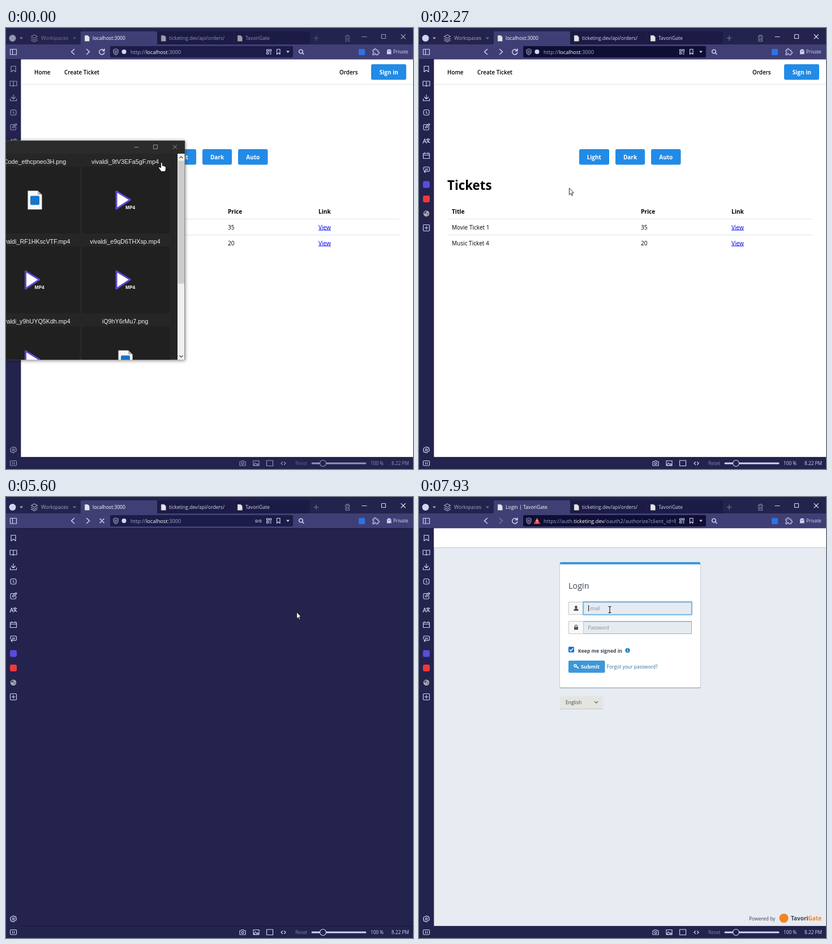
Recreate the animation shown at these times as an HTML page. Size 719 px wide and 779 px high, loop 8 s.

```html
<!DOCTYPE html>
<html lang="en">
<head>
<meta charset="utf-8">
<title>Ticketing sign-in</title>
<style>
html, body { margin: 0; width: 100%; height: 100%; overflow: hidden; background: #24234d; }
svg { display: block; width: 719px; height: 779px; }
text { font: 10.1px "Open Sans", "Noto Sans", sans-serif; white-space: pre; }
.ui text { font-size: 8.6px; fill: #d4d3f3; }
.ui .url { font-size: 9.2px; fill: #a5a4cf; }
.ui .url tspan { fill: #fff; }
.ui .small { font-size: 8.25px; }
.ui .faint { fill: #8483ae; }
.ui .lit { fill: #fff; }
.ui .count { font-size: 7.5px; font-weight: 600; }
.icon { fill: none; stroke: #d4d3f3; stroke-width: 1.15; stroke-linejoin: round; stroke-linecap: round; }
.thick { stroke-width: 1.5; }
.solid { fill: #d4d3f3; }
.semi { font-size: 9.85px; font-weight: 600; }
.bold { font-weight: 700; }
.title { font-size: 22.3px; font-weight: 700; }
.button rect { fill: #228be6; }
.button text { fill: #fff; font-size: 10px; font-weight: 700; text-anchor: middle; }
.link { fill: #00e; text-decoration: underline; }
.files text { font: 10.75px "Liberation Sans", Arial, sans-serif; fill: #f2f2f2; text-anchor: middle; }
#play text { font: 700 8.3px "Liberation Sans", Arial, sans-serif; fill: #fff; text-anchor: start; }
.login text { font-size: 8.5px; fill: #3c4650; }
.login .heading { font-size: 14.4px; font-weight: 500; }
.login .keep { font-size: 8.65px; }
.login .brand { font-size: 10px; }
.login .hint { font-size: 8.3px; fill: #858b92; }
.login .go { fill: #fff; font-size: 9.3px; font-weight: 700; }
.login .forgot { fill: #2a6f9e; }
.missing { fill: none; stroke: #68717a; stroke-width: .9; }

/* The loop lasts 8 s, so 1% is 80 ms. */
.t { animation: 8s step-end infinite; }
.home { animation-name: home; }
.login { animation-name: login; }
.local { animation-name: local; }
.remote { animation-name: remote; }
.unready { animation-name: unready; }
.ready { animation-name: ready; }
.idle { animation-name: idle; }
.busy { animation-name: busy; }
.count { animation-name: count; }
.tail { animation-name: tail; }
.field { animation-name: field; }
.forward { animation-name: forward; }
.wake { animation-name: wake; }
.status { animation-name: status; }
.hover { animation-name: hover; }
.caret { animation-name: caret; }
.arrow { animation-name: arrow; }
.hand { animation-name: hand; }
.beam { animation-name: beam; }
.files { animation: files 8s infinite; transform-origin: 120px 779px; }
.cursor { animation: move 8s linear infinite; }

@keyframes home { 0% { opacity: 1 } 70% { opacity: 0 } }
@keyframes login { 0% { opacity: 0 } 71.6% { opacity: 1 } }
@keyframes local { 0% { opacity: 1 } 70.8% { opacity: 0 } }
@keyframes remote { 0% { opacity: 0 } 70.8% { opacity: 1 } }
@keyframes unready { 0% { opacity: 1 } 73.3% { opacity: 0 } }
@keyframes ready { 0% { opacity: 0 } 73.3% { opacity: 1 } }
@keyframes idle { 0% { opacity: 1 } 50% { opacity: 0 } 73.3% { opacity: 1 } }
@keyframes busy { 0% { opacity: 0 } 50% { opacity: 1 } 73.3% { opacity: 0 } }
@keyframes count { 0% { opacity: 0 } 50% { opacity: 1 } 97.5% { opacity: .5 } 98.3% { opacity: 0 } }
@keyframes tail { 0% { opacity: 0 } 98.3% { opacity: 1 } }
@keyframes field { 0% { fill: #1c1c49 } 5.8% { fill: #0f0f35 } 50% { fill: #1c1c49 } 71.6% { fill: #0f0f35 } }
@keyframes forward { 0% { opacity: 1 } 70.8% { opacity: .4 } }
@keyframes wake { 0% { opacity: .65 } 5.8% { opacity: 1 } }
@keyframes status { 0% { opacity: 0 } 33.2% { opacity: 1 } 40.9% { opacity: 0 } }
@keyframes hover { 0% { fill: #228be6 } 46.6% { fill: #1c7ed6 } 51.6% { fill: #228be6 } }
@keyframes caret { 0% { opacity: 0 } 71.6% { opacity: 1 } 78.3% { opacity: 0 } 85% { opacity: 1 } 91.6% { opacity: 0 } 98.3% { opacity: 1 } }
@keyframes arrow { 0% { opacity: 0 } 3.3% { opacity: 1 } 33.2% { opacity: 0 } 39.2% { opacity: 1 } 46.6% { opacity: 0 } 51.6% { opacity: 1 } 82% { opacity: 0 } }
@keyframes hand { 0% { opacity: 1 } 3.3% { opacity: 0 } 33.2% { opacity: 1 } 39.2% { opacity: 0 } 46.6% { opacity: 1 } 51.6% { opacity: 0 } }
@keyframes beam { 0% { opacity: 0 } 82% { opacity: 1 } }
@keyframes files {
  0%, 5% { opacity: 1; transform: none }
  7.5%, 100% { opacity: 0; transform: translateY(60px) scale(.8) }
}
@keyframes move {
  0%, .87% { transform: translate(275px, 238px); animation-timing-function: ease-in-out }
  5%, 6.6% { transform: translate(232px, 208px); animation-timing-function: ease-in-out }
  10.87%, 11.6% { transform: translate(280px, 350px) }
  13.37% { transform: translate(246px, 346px) }
  16.5% { transform: translate(199px, 322px) }
  18.5% { transform: translate(212px, 284px) }
  20.87%, 26.6% { transform: translate(240px, 277px); animation-timing-function: ease-in-out }
  35.87%, 38.37% { transform: translate(569px, 350px) }
  40% { transform: translate(581px, 346px); animation-timing-function: ease-in-out }
  48.37%, 50% { transform: translate(676px, 80px); animation-timing-function: ease-in-out }
  57.5%, 76.6% { transform: translate(513px, 203px); animation-timing-function: ease-in }
  80% { transform: translate(430px, 224px); animation-timing-function: ease-out }
  85%, 100% { transform: translate(337px, 199px) }
}
</style>
</head>
<body>
<svg viewBox="0 0 719 779">
  <defs>
    <path id="doc" d="M-4-5H1.5L4.5-2V5.5H-4Z" fill="#e4e4e4" stroke="#77778c" stroke-width=".5"/>
    <path id="down" d="M-3-1.5H3L0 2Z"/>
    <g id="play">
      <path d="M-12-15L12.5 0L-12 16Z" fill="#fff" stroke="#5f46cf" stroke-width="3" stroke-linejoin="round"/>
      <text x="4" y="16.5">MP4</text>
    </g>
    <g id="picture">
      <path d="M-12.5-16H5L12.5-9V17H-12.5Z" fill="#f6f6f6"/>
      <path d="M5-16V-9H12.5Z" fill="#b5b5b5"/>
      <rect x="-8" y="-7" width="16" height="16" rx="2" fill="#1674c9"/>
    </g>
    <rect id="tofu" x="-2.2" y="-3.5" width="4.4" height="7"/>
    <clipPath id="urlClip"><rect x="216" y="32" width="238" height="20"/></clipPath>
    <clipPath id="filesClip"><rect y="199" width="317" height="387"/></clipPath>
    <filter id="shade" x="-10%" y="-10%" width="120%" height="120%"><feDropShadow dx="0" dy="1" stdDeviation="3" flood-opacity=".5"/></filter>
  </defs>

  <rect width="719" height="779" fill="#24234d"/>

  <g class="ui">
    <rect x="267" y="6" width="270" height="23" fill="#1c1b45"/>
    <path d="M402.5 8V27" stroke="#24234d"/>
    <path d="M132 29V8q0-2 2-2H265q2 0 2 2V29H719V55H0V29Z" fill="#403f75"/>
    <path d="M0 55.5H719M26 758.5H719" stroke="#17163c"/>
    <g class="t wake">
      <circle class="solid" cx="11.5" cy="18" r="6"/>
      <g class="solid" opacity=".75"><use href="#down" x="27" y="18"/><use href="#down" x="121" y="18" opacity=".6"/></g>
      <path class="icon" opacity=".75" d="M50 12L55.5 15L50 18L44.5 15ZM44.5 18.5L50 21.5L55.5 18.5M44.5 21.5L50 24.5L55.5 21.5"/>
      <text x="62" y="21" opacity=".75">Workspaces</text>
      <path class="icon" opacity=".5" d="M544 18H552M548 14V22M599 14.5H607.5M601.5 14V12.5H605V14M600 15V23.5H606.5V15M602 17V21.5M604.5 17V21.5"/>
      <path class="icon" d="M629 15.5H637M663.5 11.5H670.5V18.5H663.5ZM698 11.5L705.5 19M705.5 11.5L698 19"/>
      <use href="#doc" x="278" y="18"/><use href="#doc" x="413" y="18"/>
      <text x="288" y="21">ticketing.dev/api/orders/</text>
      <text x="423" y="21">TavoriGate</text>
    </g>
    <use href="#doc" x="143" y="18"/>
    <text class="lit t local" x="153" y="21">localhost:3000</text>
    <text class="lit t remote" x="153" y="21">Login | TavoriGate</text>

    <path class="icon" d="M7.5 37.5H18.5V47H7.5ZM11.5 37.5V47"/>
    <path class="icon thick" d="M120.5 37.5L115.5 42L120.5 46.5"/>
    <path class="icon thick t forward" d="M142.5 37.5L147.5 42L142.5 46.5"/>
    <path class="icon thick t idle" d="M173 39.5A4.6 4.6 0 1 0 173.8 43.5M173.8 37V40.5H170.3"/>
    <path class="icon thick t busy" d="M166 38.5L173 45.5M173 38.5L166 45.5"/>
    <rect class="t field" x="184" y="32" width="323" height="20" rx="2" fill="#0f0f35"/>
    <path class="icon" opacity=".75" d="M194 37L198 38.5V42Q198 45.5 194 47.5Q190 45.5 190 42V38.5ZM192 40.5H196M192 42.5H196M193 44.5H195"/>
    <circle class="solid t local" cx="208.5" cy="42" r="4"/>
    <g class="t remote"><path d="M208.5 36.5L214.5 47.5H202.5Z" fill="#e5473c"/><path d="M208.5 40V43.5M208.5 45V46" stroke="#fff" stroke-width="1.2"/></g>
    <text class="url t local" x="220" y="46">http://<tspan>localhost</tspan>:3000</text>
    <g clip-path="url(#urlClip)">
      <text class="url t remote" x="220" y="46">https://auth.<tspan>ticketing.dev</tspan>/oauth2/authorize?client_</text>
      <text class="url t tail" x="437" y="46">id=8</text>
    </g>
    <text class="t count" x="440" y="45">0/0</text>
    <path class="icon" d="M460.5 38H463.5V41H460.5ZM465.5 38H468.5V41H465.5ZM460.5 43H463.5V46H460.5ZM466 43.5H468.5M466 46H468.5M478.5 37.5H484V46.5L481.25 44L478.5 46.5Z"/>
    <use class="solid" href="#down" x="498" y="42"/>
    <path class="icon thick" d="M523.5 44L526 46.5M521 38.2a3.3 3.3 0 1 1-.1 0Z"/>
    <rect x="623" y="37" width="11" height="11" rx="1.5" fill="#2b73e6"/>
    <path class="icon" d="M648 39H650.5Q650 36.5 652 36.5T653.5 39H657V42Q659.5 41.5 659.5 43.5T657 45V47.5H653.5Q653.5 45 652 45T650.5 47.5H648V44.5Q650 44.5 650 43T648 41.5Z"/>
    <path class="solid" d="M673 47V41Q673 37.5 676.75 37.5T680.5 41V47L678.5 45.5L676.75 47L675 45.5Z"/><path d="M675 41H676.2M677.5 41H678.7" stroke="#403f75" stroke-width="1.3"/>
    <text class="small" x="684" y="45">Private</text>

    <g class="t wake">
      <g class="icon">
        <path d="M9 67.5H17V77.5L13 74.5L9 77.5ZM7 94H12Q13 94 13 95Q13 94 14 94H19V102H14L13 103L12 102H7ZM13 95V102M13 118V125M9.5 122L13 125.5L16.5 122M7.5 125V128.5H18.5V125"/>
        <rect x="8" y="144.5" width="10" height="9.5" rx="3.5"/><path d="M13 147V150L14.5 151"/>
        <path d="M15 170.5H9Q8 170.5 8 172V178.5Q8 180 9.5 180H16Q17.5 180 17.5 178.5V175M11.5 176.5L12 174L17.5 169L19 170.5L14 176Z"/>
        <path d="M7 203.5L10 196L13 203.5M8 201H12M13 196.5H19M16 195V196.5M14 196.5Q15 200.5 19 202.5M18 196.5Q17.5 200 14.5 202"/>
        <path d="M7.5 221.5H18.5V230.5H7.5ZM7.5 224.5H18.5M10 220V222M16 220V222M10 245.5H16Q18.5 245.5 18.5 248V251Q18.5 253.5 16 253.5H9M11 251.5L9 253.5L11 255.5M8 251V248Q8 245.5 10 245.5M11 249H15.5M11 251H15.5"/>
        <rect x="7.5" y="347.5" width="11" height="11" rx="1.5"/><path d="M10 353H16M13 350V356"/>
        <path d="M12 740H14L14.5 741.5L16.5 740.8L18 742.5L17 744L18.5 745L17.5 748L16 748L14.5 749L14 750.5H12L11.5 749L9.5 749.5L8 748L8.5 746L7.5 745L8.5 742L10 741.5L11.5 741Z"/><circle cx="13" cy="745.3" r="1.7"/>
        <rect x="7.5" y="764.5" width="11" height="8.5" rx="1.5"/><path d="M11.5 767V770.5M14.5 767V770.5"/>
        <path d="M413 766H415.5L416.5 764.5H419.5L420.5 766H423V773H413Z"/><circle cx="418" cy="769.3" r="1.8"/>
        <path d="M437 764.5H447V773H437ZM437.5 772.5L440.5 768L443 771L444.5 769.5L446.5 772.5ZM460.5 764H471.5V773.5H460.5ZM488.5 766.5L486 769L488.5 771.5M491.5 766.5L494 769L491.5 771.5"/>
      </g>
      <rect x="7" y="270.5" width="12" height="12" rx="3" fill="#5b4be0"/>
      <rect x="7" y="296" width="12" height="12" rx="3" fill="#ef3939"/>
      <circle cx="13" cy="327.8" r="5.3" fill="#a8a8ae"/><path d="M9 325Q12 323 14 325L12 328L9.5 328ZM14 328L17 327L15 331Z" fill="#55556c"/>
      <text class="small faint" x="511" y="772">Reset</text>
      <path d="M541 769H635" stroke="#d4d3f3" stroke-width="3" stroke-linecap="round"/>
      <circle cx="560" cy="769" r="5.5" fill="#24234d" stroke="#d4d3f3" stroke-width="1.2"/>
      <text class="small" x="644" y="772">100 %</text>
      <text class="small" x="681" y="772">8.22 PM</text>
    </g>
    <text class="small faint t status" x="34" y="772">http://localhost:3000/tickets/65a61f03a3732a740f80e9d5</text>
  </g>

  <g class="t home">
    <rect x="26.4" y="55.4" width="692.6" height="702.4" fill="#fff"/>
    <path d="M26.4 99.7H719M50 337.5H695M50 365.5H695" stroke="#dee2e6"/>
    <text class="semi" x="50" y="82">Home</text>
    <text class="semi" x="103" y="82">Create Ticket</text>
    <text class="semi" x="589" y="82">Orders</text>
    <g class="button">
      <rect class="t hover" x="645" y="64" width="62" height="27.5" rx="3"/><text x="676.3" y="82">Sign in</text>
      <rect x="283" y="214" width="53" height="27.5" rx="3"/><text x="309.3" y="232">Light</text>
      <rect x="347" y="214" width="52" height="27.5" rx="3"/><text x="373" y="232">Dark</text>
      <rect x="410" y="214" width="52.5" height="27.5" rx="3"/><text x="436.3" y="232">Auto</text>
    </g>
    <text class="title" x="50" y="286">Tickets</text>
    <text class="bold" x="58" y="328">Title</text><text class="bold" x="392" y="328">Price</text><text class="bold" x="552" y="328">Link</text>
    <text x="58" y="355.5">Movie Ticket 1</text><text x="392" y="355.5">35</text><text class="link" x="552" y="355.5">View</text>
    <text x="58" y="383.5">Music Ticket 4</text><text x="392" y="383.5">20</text><text class="link" x="552" y="383.5">View</text>
  </g>

  <g class="t login">
    <rect x="26.4" y="55.4" width="692.6" height="702.4" fill="#e7ebf2"/>
    <rect x="26.4" y="55.4" width="692.6" height="33.6" fill="#fff"/>
    <path d="M26.4 89.5H719" stroke="#c3c7cd"/>
    <rect x="248.5" y="116" width="249" height="222" rx="2" fill="#a9aeb5"/>
    <rect x="249" y="115" width="248" height="221.5" rx="2" fill="#fff"/>
    <path d="M249 119V117q0-2 2-2H495q2 0 2 2V119Z" fill="#3c97da"/>
    <text class="heading" x="264" y="162">Login</text>
    <g stroke="#a3abb4" fill="#e6ebf2">
      <path d="M290.5 185.5H481.5V207.5H290.5ZM290.5 219.5H481.5V241.5H290.5Z"/>
      <path d="M264.5 185.5H290.5V207.5H264.5ZM264.5 219.5H290.5V241.5H264.5Z" fill="#f8f8f8" stroke="#c3c5c9"/>
      <path d="M291 186.5H481M291 220.5H481" stroke="#bcc5cf"/>
    </g>
    <rect x="264" y="264.5" width="10" height="10" rx="1.5" fill="#0b6fdc"/>
    <path d="M266 269.5L268.3 272L272.3 267" fill="none" stroke="#fff" stroke-width="1.5"/>
    <text class="keep bold" x="281" y="274.5">Keep me signed in</text>
    <rect x="249" y="353" width="76" height="22" rx="2" fill="#c5c6c5"/>
    <rect x="249" y="352" width="76" height="22" rx="2" fill="#e4e4e1"/>
    <text x="259" y="366">English</text>
    <text x="583" y="747.5">Powered by</text>
    <circle cx="644.5" cy="744" r="8" fill="#f58320"/>
    <text class="brand bold" x="657" y="748">Tavori<tspan fill="#f58320">Gate</tspan></text>

    <g class="t unready">
      <g class="missing"><use href="#tofu" x="277.5" y="196"/><use href="#tofu" x="277.5" y="230"/><use href="#tofu" x="312.5" y="361.5"/></g>
      <use class="missing" href="#tofu" x="368" y="271" style="stroke:#2180b8"/>
      <text class="hint" x="300" y="199.5">Email</text><text class="hint" x="300" y="233.5">Password</text>
      <rect x="264" y="289" width="62.5" height="21.5" rx="2" fill="#3c97da"/>
      <use class="missing" href="#tofu" x="277.3" y="299.7" style="stroke:#fff"/>
      <text class="go" x="284" y="303">Submit</text><text class="forgot" x="329.5" y="303">Forgot your password?</text>
    </g>
    <g class="t ready">
      <rect x="290" y="185" width="192" height="23" rx="1" fill="none" stroke="#9accf0" stroke-width="2.5"/>
      <rect x="290.5" y="185.5" width="191" height="22" fill="none" stroke="#6fb1e0"/>
      <path d="M277.5 192a2.3 2.5 0 1 1-.1 0ZM273.5 201V199.5Q273.5 197 277.5 197T281.5 199.5V201Z" fill="#4a4f55"/>
      <path d="M274 229.5H281V234.5H274Z" fill="#4a4f55"/><path d="M275.5 230V228a2 2 0 0 1 4 0V230" fill="none" stroke="#4a4f55" stroke-width="1.2"/>
      <text class="hint" x="298.5" y="199.5">Email</text><text class="hint" x="298.5" y="233.5">Password</text>
      <circle cx="368.5" cy="271" r="4.2" fill="#2180b8"/><path d="M368.5 268V269.3M368.5 270.5V273.5" stroke="#fff" stroke-width="1.3"/>
      <rect x="264" y="289" width="64.5" height="21.5" rx="2" fill="#3c97da"/>
      <g fill="none" stroke="#fff" stroke-width="1.5"><circle cx="276" cy="298" r="2"/><path d="M277.5 299.5L282 303M280 301.5L281 300"/></g>
      <text class="go" x="286" y="303">Submit</text><text class="forgot" x="331.5" y="303">Forgot your password?</text>
      <path d="M310 361L313.2 364L316.4 361" fill="none" stroke="#555b62" stroke-width="1.1"/>
    </g>
    <path class="t caret" d="M299.5 191V202" stroke="#222"/>
  </g>

  <g class="files">
    <rect x="-40" y="199" width="356" height="387" fill="#272727" stroke="#777" stroke-width=".6" filter="url(#shade)"/>
    <rect y="199.5" width="316" height="22.5" fill="#2b2b2b"/>
    <path d="M226.5 210.5H234M260.5 206.5H267.5V213.5H260.5ZM295 206.5L302 213.5M302 206.5L295 213.5" fill="none" stroke="#9a9a9a"/>
    <g clip-path="url(#filesClip)">
      <path d="M0 245H130V363H0ZM134 245H289.5V363H134ZM0 386H130V504H0ZM134 386H289.5V504H134ZM0 527H130V586H0ZM134 527H289.5V586H134Z" fill="#202020"/>
      <text x="51" y="239.5">Code_ethcpneo3H.png</text><text x="210.5" y="239.5">vivaldi_9tV3EFa5gF.mp4</text>
      <text x="51" y="380.5">vivaldi_RF1HKscVTF.mp4</text><text x="210.5" y="380.5">vivaldi_e9qD6THXsp.mp4</text>
      <text x="51" y="521.5">vivaldi_y9hUYQ5Kdh.mp4</text><text x="210.5" y="521.5">iQ9hY6rMu7.png</text>
      <use href="#picture" x="51" y="303.5"/><use href="#play" x="207" y="303.5"/>
      <use href="#play" x="46.5" y="444.5"/><use href="#play" x="207" y="444.5"/>
      <use href="#play" x="46.5" y="585.5"/><use href="#picture" x="211" y="585.5"/>
    </g>
    <rect x="303" y="222" width="12.5" height="364" fill="#f0f0f0"/>
    <rect x="304" y="234.5" width="11" height="217" fill="#cdcdcd"/>
    <path d="M306.5 230L309.5 227L312.5 230M306.5 578.5L309.5 581.5L312.5 578.5" fill="none" stroke="#505050" stroke-width="1.3"/>
  </g>

  <g class="cursor" fill="#fff" stroke="#111" stroke-width=".9" stroke-linejoin="round">
    <path class="t arrow" d="M.5.2V12L3.2 9.5L5 13.6L6.7 12.8L5 8.8H8.4Z"/>
    <path class="t hand" d="M-1.5 9V1Q-1.5-.5-.2-.5T1.2 1V5.5Q2.5 4.5 3.6 6Q5 5.2 5.7 6.6Q7.3 6.2 7.3 8V11Q7.3 13.5 5.8 15.5H-.8Q-2.5 13-5 9.8Q-5.8 8.3-4.6 7.8Q-3.4 7.4-1.5 9Z"/>
    <path class="t beam" d="M-2.5-5.5H-.8L0-4.8L.8-5.5H2.5M0-4.8V4.8M-2.5 5.5H-.8L0 4.8L.8 5.5H2.5" fill="none" stroke-width="1.1"/>
  </g>
</svg>
</body>
</html>
```
